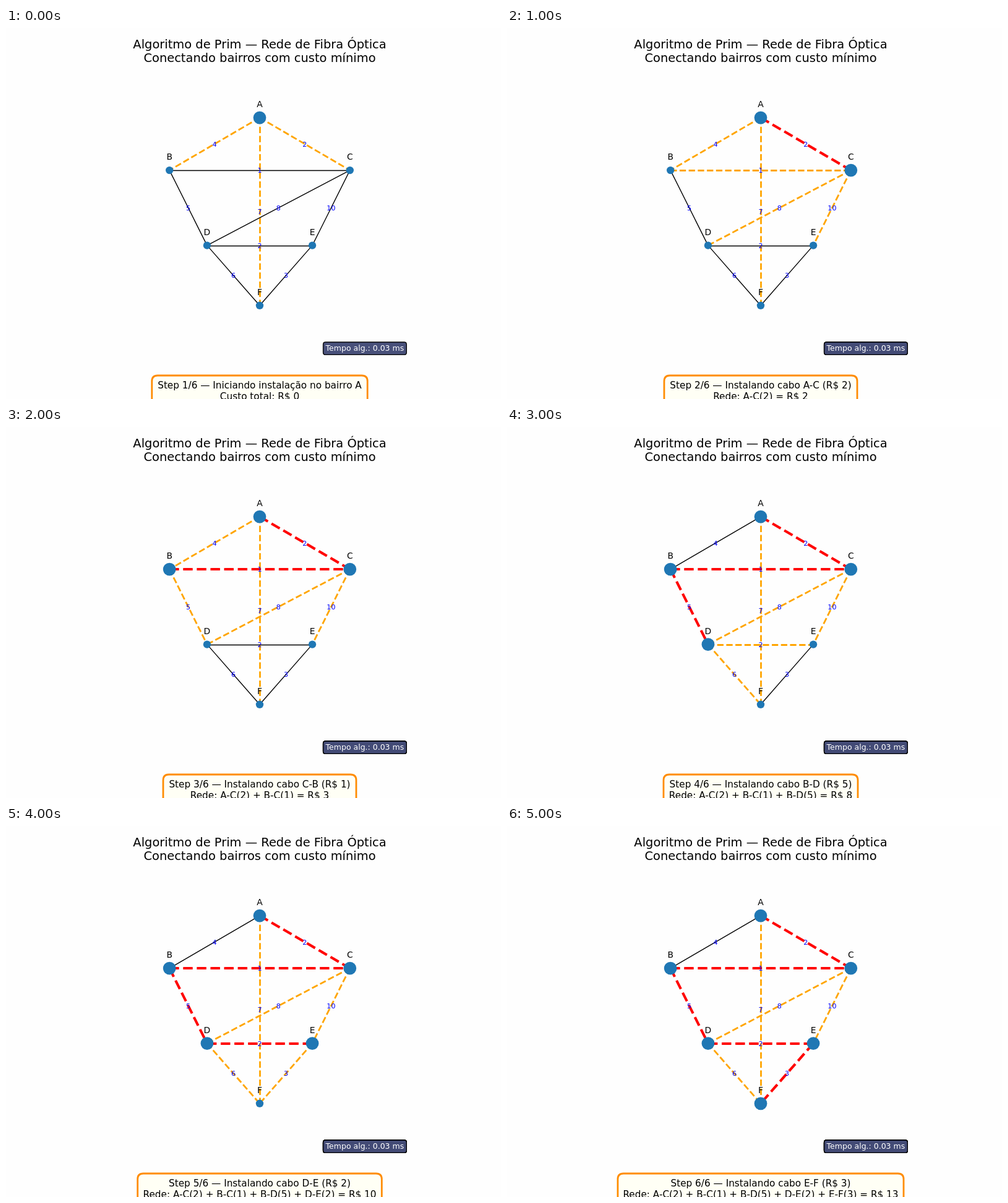
An HTML page for the animation above (6000 ms loop, 800x600 px).

```html
<!DOCTYPE html>
<html lang="pt">
<head>
<meta charset="utf-8">
<title>Algoritmo de Prim</title>
<style>
  html, body { margin: 0; width: 100%; height: 100%; overflow: hidden; background: #fefefe; }
  svg { display: block; width: 800px; height: 600px; }
  text { font-family: "DejaVu Sans", sans-serif; text-anchor: middle; white-space: pre; }
</style>
</head>
<body>
<svg id="stage" viewBox="0 0 800 600"></svg>
<script>
const STEP_MS = 1000;
const PT = 100 / 72;
const stage = document.getElementById('stage');

const NODES = { A: [0, 2.5], B: [-1.2, 1.8], C: [1.2, 1.8], D: [-0.7, 0.8], E: [0.7, 0.8], F: [0, 0] };
const EDGES = [['A', 'B', 4], ['A', 'C', 2], ['A', 'F', 7], ['B', 'C', 1], ['B', 'D', 5],
  ['C', 'D', 8], ['C', 'E', 10], ['D', 'E', 2], ['E', 'F', 3], ['D', 'F', 6]];
const STYLES = {
  idle: { color: '#000', width: PT },
  queued: { color: '#ffa500', width: 2 * PT, dashed: true },
  chosen: { color: '#f00', width: 3 * PT, dashed: true }
};
const BOX_HALF = [174.2, 156, 156, 157, 197.3, 231];

const pos = name => [410 + NODES[name][0] * 121.5, 448.8 - NODES[name][1] * 121.5];

function add(tag, attrs, parent = stage) {
  const el = document.createElementNS('http://www.w3.org/2000/svg', tag);
  set(el, attrs);
  return parent.appendChild(el);
}

function set(el, attrs) {
  for (const key in attrs) el.setAttribute(key, attrs[key]);
}

function label(x, y, pt, str, fill = '#000') {
  const el = add('text', { x, y, fill, 'font-size': pt * PT });
  el.textContent = str;
  return el;
}

// Rectangle with quadratic corners
function roundBox(x0, y0, x1, y1, r) {
  return `M${x0 + r} ${y0}H${x1 - r}Q${x1} ${y0} ${x1} ${y0 + r}V${y1 - r}Q${x1} ${y1} ${x1 - r} ${y1}` +
    `H${x0 + r}Q${x0} ${y1} ${x0} ${y1 - r}V${y0 + r}Q${x0} ${y0} ${x0 + r} ${y0}Z`;
}

// Lazy Prim: one snapshot per installed node
function prim(start) {
  const state = EDGES.map(() => 'idle');
  const seen = new Set(), tree = [], steps = [];
  let queue = [];
  const visit = (node, via, from) => {
    seen.add(node);
    EDGES.forEach(([a, b], i) => {
      const other = a === node ? b : b === node ? a : null;
      if (other && !seen.has(other)) {
        queue.push({ i, from: node, to: other });
        state[i] = 'queued';
      }
    });
    let lines = ['Iniciando instalação no bairro ' + node, 'Custo total: R$ 0'];
    if (via) {
      tree.push(via);
      const total = tree.reduce((sum, e) => sum + e[2], 0);
      const list = tree.map(([a, b, w]) => `${a}-${b}(${w})`).join(' + ');
      lines = [`Instalando cabo ${from}-${node} (R$ ${via[2]})`, `Rede: ${list} = R$ ${total}`];
    }
    steps.push({ state: [...state], seen: new Set(seen), lines });
  };
  visit(start);
  while (seen.size < Object.keys(NODES).length) {
    queue.sort((p, q) => EDGES[p.i][2] - EDGES[q.i][2]);
    const { i, from, to } = queue.shift();
    state[i] = seen.has(to) ? 'idle' : 'chosen';
    if (!seen.has(to)) visit(to, EDGES[i], from);
  }
  return steps;
}

function drawEdge(el, [a, b], { color, width, dashed }) {
  let [x1, y1] = pos(a), [x2, y2] = pos(b);
  // Axis-aligned lines sit on the pixel grid
  const snap = v => Math.floor(v + 0.5) + (Math.round(width) % 2) / 2;
  if (x1 === x2) x1 = x2 = snap(x1);
  if (y1 === y2) y1 = y2 = snap(y1);
  set(el, {
    x1, y1, x2, y2, stroke: color, 'stroke-width': width,
    'stroke-dasharray': dashed ? `${3.7 * width} ${1.6 * width}` : 'none'
  });
}

const steps = prim('A');
label(410, 33, 14, 'Algoritmo de Prim — Rede de Fibra Óptica');
label(410, 55, 14, 'Conectando bairros com custo mínimo');

const lines = EDGES.map(() => add('line', {}));
const dots = Object.keys(NODES).map(name => {
  const [cx, cy] = pos(name);
  return add('circle', { cx, cy, fill: '#1f77b4' });
});
for (const name in NODES) {
  const [x, y] = pos(name);
  label(x, y - 17, 10, name);
}
for (const [a, b, w] of EDGES) {
  const [x1, y1] = pos(a), [x2, y2] = pos(b);
  label((x1 + x2) / 2, (y1 + y2) / 2 + 4, 8, w, '#00f');
}

// The translucent badge is laid down once more at every step
const badges = steps.map(() => add('path', {
  d: roundBox(512.6, 508, 647.3, 528.4, 3.75),
  fill: '#434b76', stroke: '#000', 'stroke-width': PT, opacity: 0.97
}));
label(579.9, 522, 9, 'Tempo alg.: 0.03 ms', '#fff');

const box = add('path', { fill: '#fffff5', stroke: '#ff8c00', 'stroke-width': 2 * PT });
const caption = [583, 601].map(y => label(410, y, 11, ''));

function render(time) {
  const n = Math.floor(time / STEP_MS) % steps.length;
  const step = steps[n];
  lines.forEach((el, i) => drawEdge(el, EDGES[i], STYLES[step.state[i]]));
  Object.keys(NODES).forEach((name, i) => set(dots[i], { r: step.seen.has(name) ? 10.4 : 6.2 }));
  badges.forEach((el, i) => set(el, { display: i <= n ? 'inline' : 'none' }));
  set(box, { d: roundBox(410 - BOX_HALF[n], 562, 410 + BOX_HALF[n], 615, 9.17) });
  caption[0].textContent = `Step ${n + 1}/${steps.length} — ${step.lines[0]}`;
  caption[1].textContent = step.lines[1];
}

const begin = performance.now();
function tick() {
  render(performance.now() - begin);
  requestAnimationFrame(tick);
}
tick();
</script>
</body>
</html>
```
